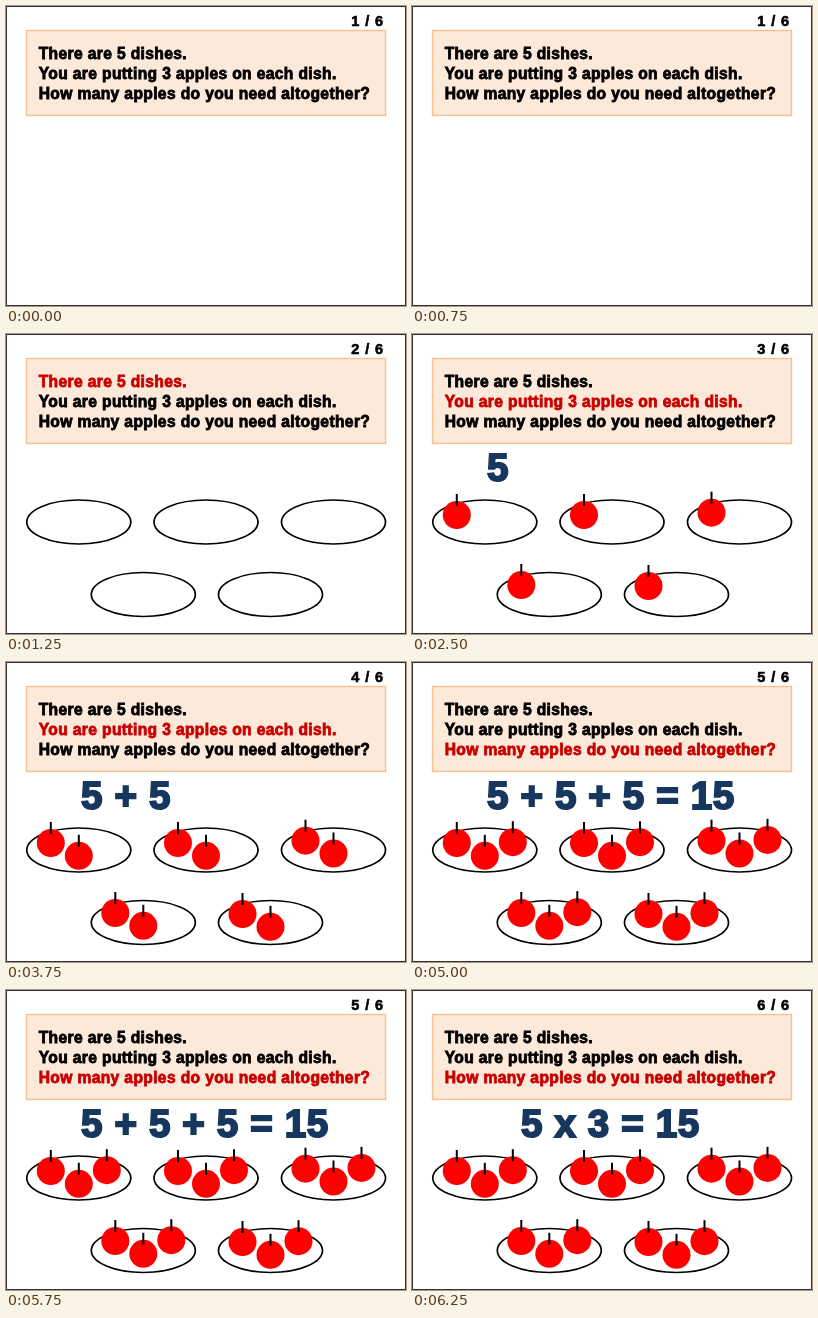
An HTML page for the animation above (7500 ms loop, 400 px wide and 300 px high).

```html
<!DOCTYPE html>
<html lang="en">
<head>
<meta charset="utf-8">
<title>Apples on dishes</title>
<style>
  html, body { margin: 0; width: 100%; height: 100%; overflow: hidden; background: #fff; }
  svg { display: block; width: 100%; height: 100%; }
  text { font-family: "Liberation Sans", Arial, sans-serif; font-weight: bold; white-space: pre; stroke: currentColor; fill: currentColor; }
  .story { font-size: 15.6px; letter-spacing: .37px; stroke-width: .8px; color: #000; }
  .story .active { color: #c80000; }
  #sum { font-size: 38.5px; letter-spacing: .65px; stroke-width: 2px; color: #17375e; }
  #page { font-size: 14.5px; letter-spacing: .9px; stroke-width: .6px; text-anchor: end; }
  .dish { fill: none; stroke: #000; stroke-width: 1.7px; }
  .apple circle { fill: #f00; }
  .apple path { stroke: #000; stroke-width: 2px; }
</style>
</head>
<body>
<svg viewBox="0 0 400 300">
  <rect x=".5" y=".5" width="399" height="299" fill="#fff" stroke="#333"/>
  <rect x="20.5" y="24.5" width="359" height="85" fill="#fde9d9" stroke="#fac090" stroke-width="1.4"/>
  <text id="page" x="378" y="20"></text>
  <g class="story">
    <text x="32.7" y="53">There are 5 dishes.</text>
    <text x="32.7" y="73">You are putting 3 apples on each dish.</text>
    <text x="32.7" y="93">How many apples do you need altogether?</text>
  </g>
  <text id="sum" y="146.5"></text>
  <g id="dishes"></g>
</svg>
<script>
const STEP_MS = 1250;
const steps = [
  { line: -1, apples: 0, sum: "", x: 75, dishes: false },
  { line: 0, apples: 0, sum: "", x: 75, dishes: true },
  { line: 1, apples: 1, sum: "5", x: 75, dishes: true },
  { line: 1, apples: 2, sum: "5 + 5", x: 75, dishes: true },
  { line: 2, apples: 3, sum: "5 + 5 + 5 = 15", x: 75, dishes: true },
  { line: 2, apples: 3, sum: "5 x 3 = 15", x: 109, dishes: true },
];

// Centre of each dish and the height of its first apple.
const dishes = [
  [72.8, 188, 181], [200, 188, 181], [327.5, 188, 178.7],
  [137.3, 260.5, 251], [264.5, 260.5, 252],
];
const appleOffsets = [[-28, 0], [0, 12.8], [28, -.8]];

const apple = (x, y, order) =>
  `<g class="apple" data-order="${order}" transform="translate(${x} ${y})">
     <circle r="14"/><path d="M0-21V-9"/>
   </g>`;

const byId = id => document.getElementById(id);
const [page, sum, dishGroup] = ["page", "sum", "dishes"].map(byId);
const lines = document.querySelectorAll(".story text");

dishGroup.innerHTML = dishes.map(([x, y, top]) =>
  `<ellipse class="dish" cx="${x}" cy="${y}" rx="52" ry="22"/>` +
  appleOffsets.map(([dx, dy], i) => apple(x + dx, top + dy, i)).join("")
).join("");
const apples = dishGroup.querySelectorAll(".apple");

const show = (element, visible) => element.style.display = visible ? "" : "none";

function draw(index) {
  const step = steps[index];
  page.textContent = `${index + 1} / ${steps.length}`;
  sum.textContent = step.sum;
  sum.setAttribute("x", step.x);
  lines.forEach((line, i) => line.classList.toggle("active", i === step.line));
  show(dishGroup, step.dishes);
  apples.forEach(item => show(item, item.dataset.order < step.apples));
}

let start, shown;
function tick(now) {
  start ??= now;
  const index = Math.floor((now - start) / STEP_MS) % steps.length;
  if (index !== shown) draw(shown = index);
  requestAnimationFrame(tick);
}
draw(shown = 0);
requestAnimationFrame(tick);
</script>
</body>
</html>
```
